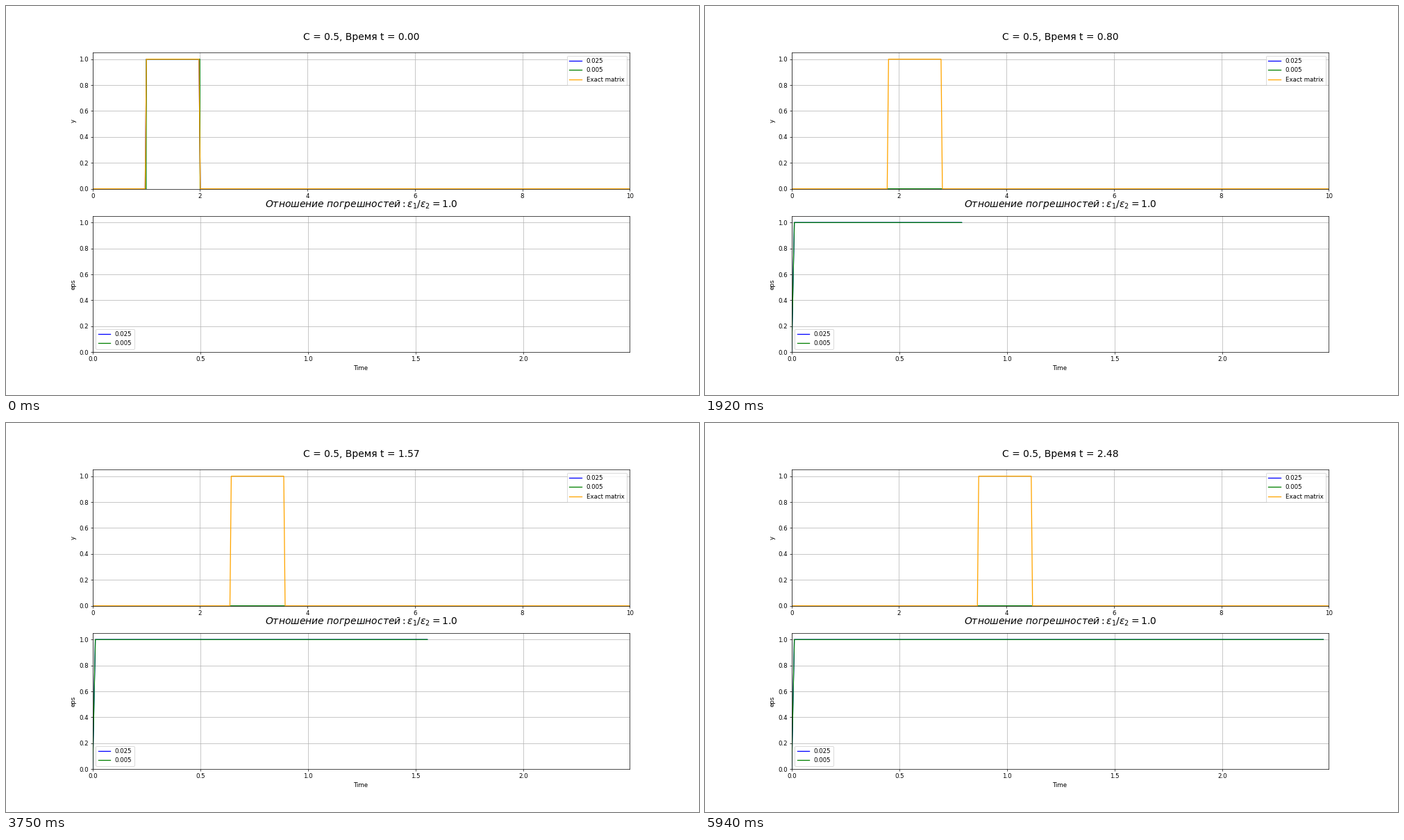
Animation of 998x561 px, one loop 5.97 s. Source, as a matplotlib script:

```python
import numpy as np
import matplotlib.pyplot as plt
from matplotlib.animation import FuncAnimation

FRAMES = 199
C = 0.5

plt.rcParams["font.family"] = "DejaVu Sans"

x1 = np.linspace(0, 10, 400)
x2 = np.linspace(0, 10, 2000)
dt1 = C * x1[1]
dt2 = C * x2[1]
times = np.arange(FRAMES) * dt1
eps = np.where(times > 0, 1.0, 0.0)


def pulse(x, left, right):
    return np.where((x >= left) & (x <= right), 1.0, 0.0)


def shrinking(x, steps):
    """Unit pulse whose left edge loses one cell per time step."""
    u = pulse(x, 1, 2)
    first = np.argmax(u)
    u[first:first + steps] = 0
    return u


fig, (top, low) = plt.subplots(2, 1, figsize=(16, 8.994), dpi=62.375)

coarse, = top.plot([], [], color="blue", label="0.025")
fine, = top.plot([], [], color="green", label="0.005")
exact, = top.plot([], [], color="orange", label="Exact matrix")
top.set(xlim=(0, 10), ylim=(0, 1.05), ylabel="y")
top.legend(loc="upper right")
title = top.set_title("", fontsize=16, pad=21)

err1, = low.plot([], [], color="blue", label="0.025")
err2, = low.plot([], [], color="green", label="0.005")
low.set(xlim=(0, FRAMES * dt1), ylim=(0, 1.05), xlabel="Time", ylabel="eps")
low.legend(loc="lower left")
low.set_title(r"$Отношение\ погрешностей: \varepsilon_1/\varepsilon_2 = 1.0$",
              fontsize=16, pad=15)

for ax in (top, low):
    ax.grid(True)


def update(n):
    t = times[n]
    coarse.set_data(x1, shrinking(x1, n))
    fine.set_data(x2, shrinking(x2, int(t / dt2)))
    exact.set_data(x1, pulse(x1, 1 + t, 2 + t))
    for line in (err1, err2):
        line.set_data(times[:n], eps[:n])
    title.set_text(f"C = {C}, Время t = {t:.2f}")
    return coarse, fine, exact, err1, err2, title


anim = FuncAnimation(fig, update, frames=FRAMES, interval=30, repeat=True,
                     repeat_delay=0, blit=False)
plt.show()
```
